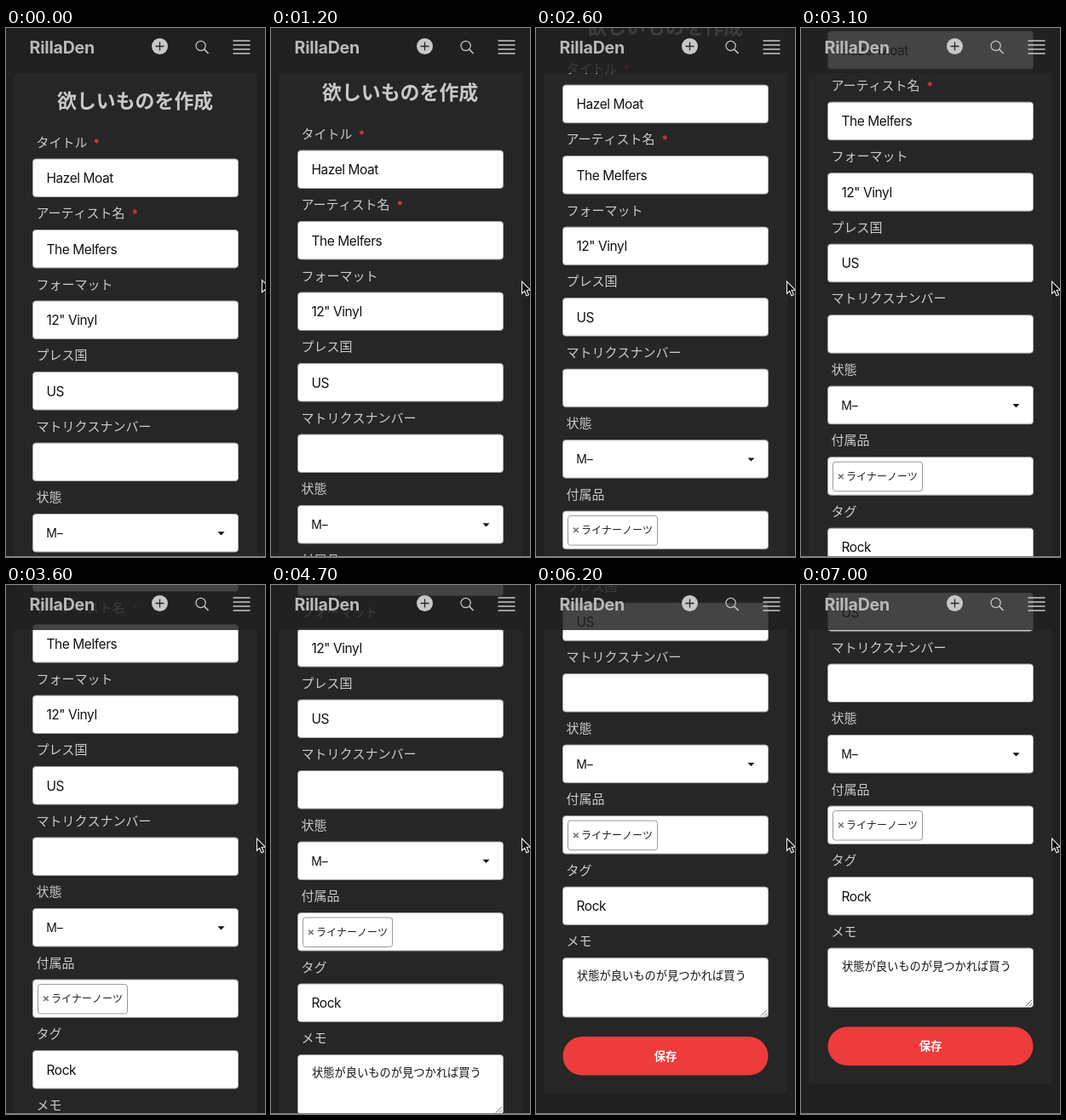
Write an HTML page with a canvas that moves like this. It is 304x622 px and loops after 7.1 s.

```html
<!DOCTYPE html>
<html lang="ja">
<head>
<meta charset="utf-8">
<title>Form scroll</title>
<style>
html, body { margin: 0; width: 100%; height: 100%; overflow: hidden; background: #202020; }
canvas { display: block; width: 304px; height: 622px; }
</style>
</head>
<body>
<canvas id="stage"></canvas>
<script>
const W = 304, H = 622, LOOP = 7100, STEP = 100;
const LATIN = 'Inter, "Noto Sans", sans-serif';
const CJK = '"Noto Sans CJK JP", "Noto Sans CJK", sans-serif';
const LEFT = 31.5, WIDTH = 241, PITCH = 83.5;

const canvas = document.getElementById('stage');
const ctx = canvas.getContext('2d');
const dpr = window.devicePixelRatio || 1;
canvas.width = W * dpr;
canvas.height = H * dpr;

const smooth = p => p * p * (3 - 2 * p);
const easeOut = p => 1 - (1 - p) * (1 - p);

// Each flick: start, end, distance, easing
const flicks = [
  [900, 2200, 74, smooth],
  [2340, 3600, 117, smooth],
  [3970, 5500, 168.5, smooth],
  [5600, 7000, 35.5, easeOut]
];

function scrollAt(t) {
  return flicks.reduce((sum, [from, to, dist, ease]) =>
    sum + dist * ease(Math.min(1, Math.max(0, (t - from) / (to - from)))), 0);
}

function cursorAt(t) {
  if (t >= 500) return [294.5, 298];
  const p = easeOut(Math.min(1, t / 300));
  return [300.5 - 5.5 * p, 296.5 + p];
}

// Text placed by its left edge (or centre) and its vertical middle
function text(str, x, mid, size, color, { font = LATIN, weight = 400, align = 'left', spacing = 0 } = {}) {
  ctx.font = `${weight} ${size}px ${font}`;
  ctx.letterSpacing = spacing + 'px';
  ctx.textAlign = align;
  ctx.fillStyle = color;
  ctx.fillText(str, x, mid + size * (font === CJK ? 0.38 : 0.36));
}

function box(x, y, w, h, r, fill, stroke) {
  ctx.beginPath();
  ctx.roundRect(x, y, w, h, r);
  ctx.fillStyle = fill;
  ctx.fill();
  if (stroke) {
    ctx.strokeStyle = stroke;
    ctx.lineWidth = 1;
    ctx.stroke();
  }
}

function lines(segments, color, width) {
  ctx.beginPath();
  for (const [x1, y1, x2, y2] of segments) {
    ctx.moveTo(x1, y1);
    ctx.lineTo(x2, y2);
  }
  ctx.strokeStyle = color;
  ctx.lineWidth = width;
  ctx.stroke();
}

const rows = [
  { label: 'タイトル', value: 'Hazel Moat', required: true },
  { label: 'アーティスト名', value: 'The Melfers', required: true },
  { label: 'フォーマット', value: '12" Vinyl' },
  { label: 'プレス国', value: 'US' },
  { label: 'マトリクスナンバー' },
  { label: '状態', draw: drawSelect },
  { label: '付属品', draw: drawTag },
  { label: 'タグ', value: 'Rock' },
  { label: 'メモ', height: 69.5, draw: drawMemo }
];

function drawSelect(y) {
  text('M–', 47.3, y + 22.5, 14, '#111', { spacing: -0.1 });
  ctx.beginPath();
  ctx.moveTo(248.5, y + 20.8);
  ctx.lineTo(256.5, y + 20.8);
  ctx.lineTo(252.5, y + 25);
  ctx.fillStyle = '#111';
  ctx.fill();
}

function drawTag(y) {
  box(37.5, y + 5.5, 105, 34.5, 3, '#fff', '#999');
  text('×', 46.8, y + 22.5, 13, '#777', { weight: 700, align: 'center' });
  text('ライナーノーツ', 53, y + 22.5, 12, '#222', { font: CJK });
}

function drawMemo(y) {
  text('状態が良いものが見つかれば買う', 48, y + 20.8, 13.25, '#151515', { font: CJK });
  lines([[264, y + 68, 271, y + 61], [268, y + 68, 271, y + 65]], '#666', 1);
}

function drawRow(row, i) {
  const mid = 134 + PITCH * i, top = 154 + PITCH * i;
  text(row.label, 35.5, mid, 15, '#cbcbcb', { font: CJK });
  if (row.required) {
    text('*', 42.6 + row.label.length * 15, mid + 1.5, 14, '#e23c3c', { weight: 600 });
  }
  box(LEFT, top, WIDTH, row.height || 44.5, 3.5, '#fff', '#a8a8a8');
  if (row.value) text(row.value, 47.5, top + 22.5, 15.5, '#111', { spacing: -0.45 });
  if (row.draw) row.draw(top);
}

function drawForm() {
  box(9, 53, 286, 929, 4, '#262626');
  text('欲しいものを作成', 151.6, 85, 22.9, '#c8c8c8', { font: CJK, weight: 700, align: 'center' });
  rows.forEach(drawRow);
  box(31.5, 914.5, 241, 45.5, 22.75, '#ee3b3b');
  text('保存', 152, 937, 13.3, '#fff', { font: CJK, weight: 700, align: 'center' });
}

function drawHeader() {
  const ink = '#c8c8c8';
  ctx.fillStyle = 'rgba(33,33,33,.84)';
  ctx.fillRect(0, 0, W, 53);
  text('RillaDen', 27.5, 23, 19.6, '#b9b9b9', { weight: 700, spacing: -0.2 });

  box(171, 12, 19, 19, 9.5, ink);
  lines([[175.5, 21.5, 185.5, 21.5], [180.5, 16.5, 180.5, 26.5]], '#262626', 1.3);

  ctx.beginPath();
  ctx.arc(228.6, 21, 5.6, 0, Math.PI * 2);
  ctx.strokeStyle = ink;
  ctx.lineWidth = 1.2;
  ctx.stroke();
  lines([[232.6, 25, 237.6, 30]], ink, 1.6);

  lines([15, 20, 25, 30].map(y => [266.5, y, 286.5, y]), ink, 1.3);
}

function drawCursor(x, y) {
  ctx.save();
  ctx.translate(x, y);
  ctx.beginPath();
  for (const [px, py] of [[0, 0], [0, 14.2], [3.2, 11.3], [5.4, 16.8], [7.9, 15.8], [5.6, 10.3], [10, 10.2]]) {
    ctx.lineTo(px, py);
  }
  ctx.closePath();
  ctx.fillStyle = '#000';
  ctx.fill();
  ctx.strokeStyle = '#f4f4f4';
  ctx.lineWidth = 1.1;
  ctx.stroke();
  ctx.restore();
}

function draw(t) {
  ctx.setTransform(dpr, 0, 0, dpr, 0, 0);
  ctx.fillStyle = '#202020';
  ctx.fillRect(0, 0, W, H);

  ctx.save();
  ctx.translate(0, -scrollAt(t));
  drawForm();
  ctx.restore();

  drawHeader();
  ctx.fillStyle = '#857f80';
  ctx.fillRect(0, 621, W, 1);
  drawCursor(...cursorAt(t));
}

const start = performance.now();
function tick() {
  const t = (performance.now() - start) % LOOP;
  draw(Math.floor(t / STEP) * STEP);
  requestAnimationFrame(tick);
}
tick();
</script>
</body>
</html>
```
